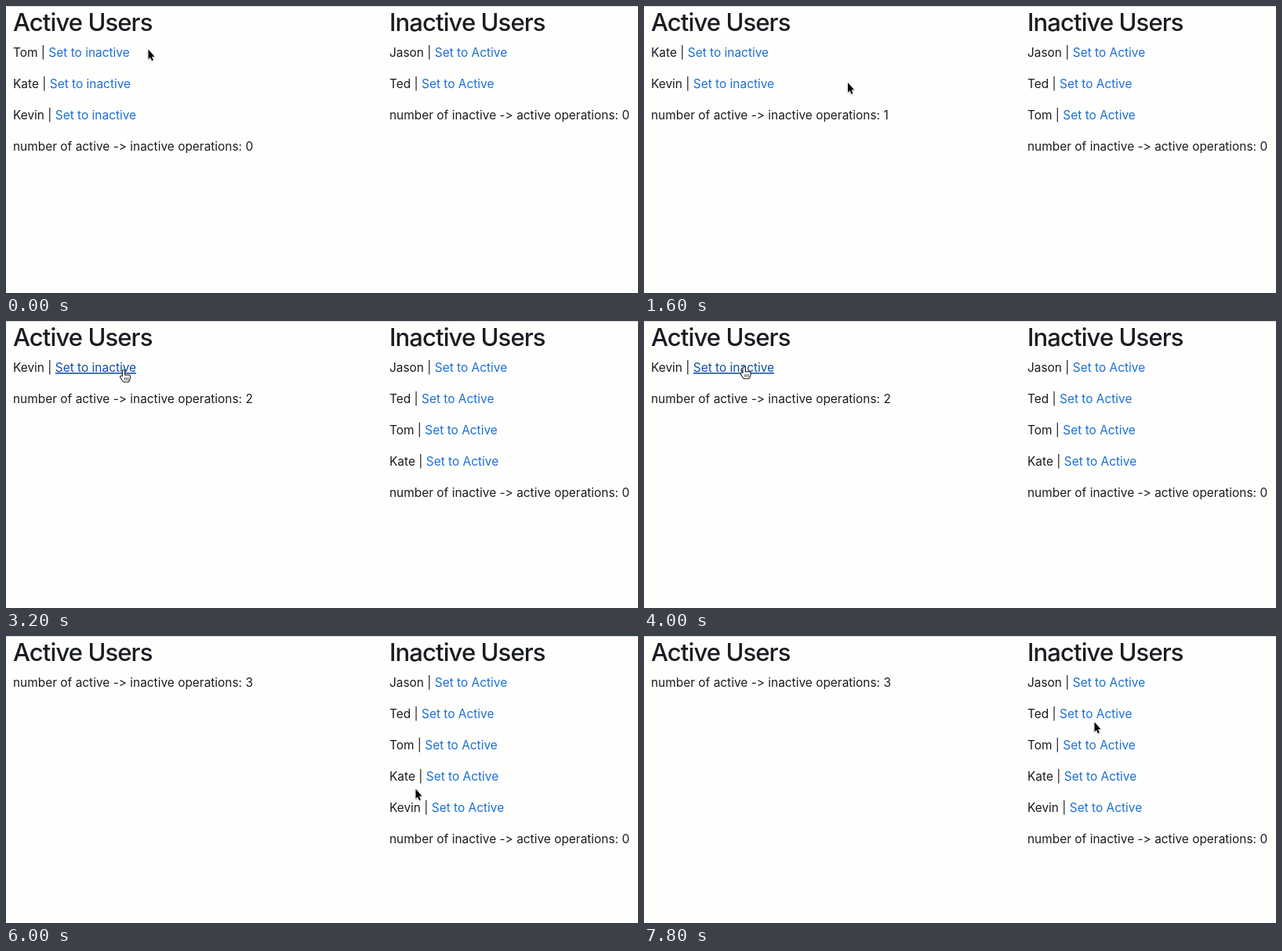
An HTML page that plays this animation: 806x367 px, repeating every 8 s.

```html
<!DOCTYPE html>
<html lang="en">
<head>
<meta charset="utf-8">
<title>Active and inactive users</title>
<style>
  html, body { margin: 0; width: 100%; height: 100%; overflow: hidden; background: #fefefd; }
  svg { display: block; cursor: default; }
  text {
    font: 430 15.4px Inter, sans-serif;
    font-feature-settings: "calt" 0;
    font-optical-sizing: none;
    letter-spacing: .02px;
    fill: #191c21;
    white-space: pre;
    user-select: none;
  }
  .title { font-size: 31px; font-weight: 500; letter-spacing: -.029em; }
  .link { fill: #1a6fd4; }
  .link.hover { fill: #0f4f9e; text-decoration: underline; }
  #pointer { pointer-events: none; }
  #arrow { fill: #000; stroke: #fff; paint-order: stroke; filter: drop-shadow(0 1px 1px #0004); }
  #hand { stroke-linecap: round; stroke-linejoin: round; }
  .outline { fill: #111; stroke: #111; stroke-width: 4.2; }
  .skin { fill: #fff; stroke: #fff; stroke-width: 2.2; }
  .creases { stroke: #111; stroke-width: .8; }
</style>
</head>
<body>
<svg width="806" height="367">
  <defs><path id="palm" d="M0 2V8.5H6.8V11L5.5 14.4H.5L-2.8 9.6L0 12Z"/></defs>
  <path d="M0 .5H806" stroke="#dcdcdc"/>
  <g id="lists"></g>
  <g id="pointer">
    <path id="arrow" d="M.5 .5V13L3 10.5L5 15L6.8 14.2L5 9.8H8.5Z"/>
    <g id="hand">
      <use href="#palm" class="outline"/>
      <use href="#palm" class="skin"/>
      <path class="creases" d="M1.2 10.5v3m2.2-3v3m2.2-3v3"/>
    </g>
  </g>
</svg>
<script>
const LOOP = 8000, STEP = 200;
const CLICK_PERIOD = 2400, FIRST_CLICK = 600;
const activeUsers = ["Tom", "Kate", "Kevin"], inactiveUsers = ["Jason", "Ted"];

// Where the pointer comes to rest
const stops = [
  { time: 0, x: 181, y: 55 },
  { time: 800, x: 137, y: 52 },
  { time: 2400, x: 277, y: 104 },
  { time: 3200, x: 150, y: 62 },
  { time: 5000, x: 123, y: 57 },
  { time: 5400, x: 123, y: 57 },
  { time: 6000, x: 522, y: 195 },
  { time: 7800, x: 574, y: 109.5 }
];

const byId = id => document.getElementById(id);
const lists = byId("lists"), pointer = byId("pointer");
const arrow = byId("arrow"), hand = byId("hand");
let shown = -1;

function column(x, title, names, action, summary) {
  const rows = names.map(name => `${name} | <tspan class="link">${action}</tspan>`);
  return `<text class="title" x="${x}" y="32">${title}</text>` + [...rows, summary]
    .map((row, i) => `<text x="${x}" y="${65 + 40 * i}">${row}</text>`).join("");
}

function showLists(moved) {
  if (moved === shown) return;
  shown = moved;
  lists.innerHTML =
    column(9, "Active Users", activeUsers.slice(moved), "Set to inactive",
      `number of active -&gt; inactive operations: ${moved}`) +
    column(489, "Inactive Users", [...inactiveUsers, ...activeUsers.slice(0, moved)],
      "Set to Active", "number of inactive -&gt; active operations: 0");
}

function pointerAt(time) {
  const next = stops.findIndex(stop => stop.time >= time);
  const to = stops[next], from = stops[Math.max(next - 1, 0)];
  const progress = (time - from.time) / (to.time - from.time || 1);
  const ease = 1 - (1 - progress) ** 3;
  return [from.x + (to.x - from.x) * ease, from.y + (to.y - from.y) * ease];
}

function draw(now) {
  const time = Math.floor(now % LOOP / STEP) * STEP;
  const clicks = Math.floor((time - FIRST_CLICK) / CLICK_PERIOD) + 1;
  showLists(Math.min(clicks, activeUsers.length));

  const [x, y] = pointerAt(time);
  pointer.setAttribute("transform", `translate(${x} ${y})`);
  const target = document.elementFromPoint(x, y)?.closest(".link");
  for (const link of lists.querySelectorAll(".link")) {
    link.classList.toggle("hover", link === target);
  }
  arrow.style.display = target ? "none" : "";
  hand.style.display = target ? "" : "none";
}

const start = performance.now();
function tick() {
  draw(performance.now() - start);
  requestAnimationFrame(tick);
}
tick();
</script>
</body>
</html>
```
